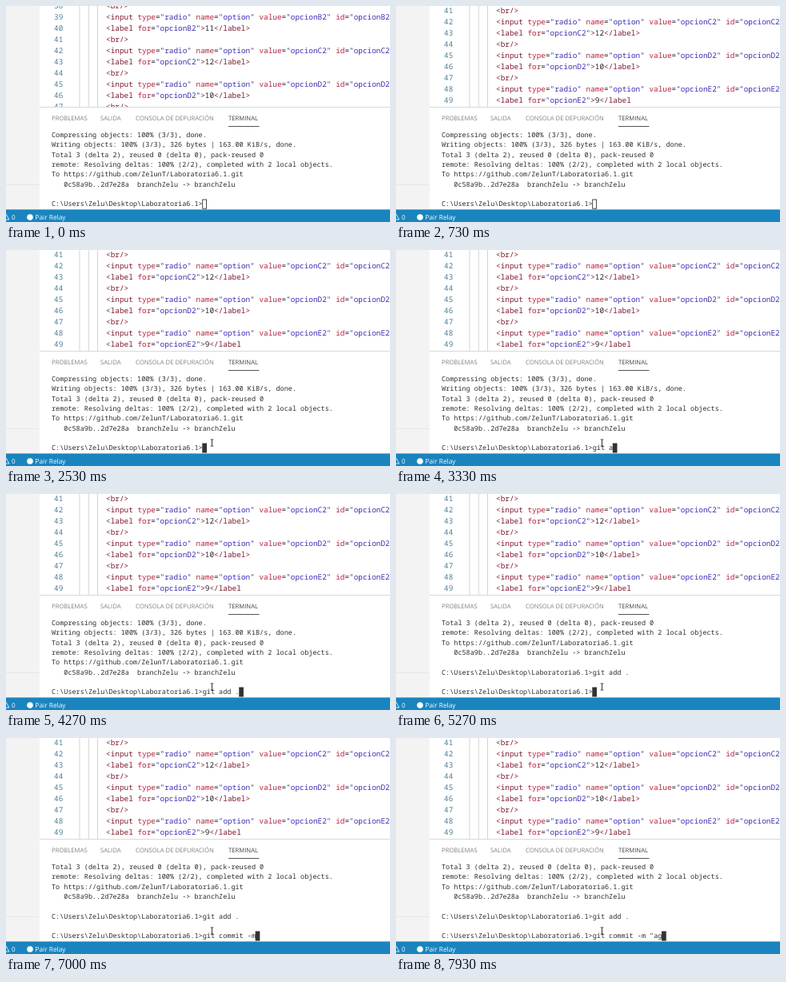
Write an HTML page with a canvas that moves like this. It is 480 by 270 pixels and loops after 8 s.

```html
<!DOCTYPE html>
<html lang="es">
<head>
<meta charset="utf-8">
<title>Terminal</title>
<style>
  html, body { margin: 0; width: 100%; height: 100%; overflow: hidden; background: #fff; }
  canvas { display: block; width: 480px; height: 270px; }
</style>
</head>
<body>
<canvas id="stage"></canvas>
<script>
const LOOP = 8000;
const SCROLL_AT = 70, POINTER_FROM = 930, POINTER_TO = 1200, FOCUS_AT = 1530, ENTER_AT = 4470;
const MONO = '"Noto Sans Mono", "DejaVu Sans Mono", monospace';
const SANS = '"Open Sans", "Noto Sans", sans-serif';
const CODE = { x: 125, char: 5.63, line: 13.95, size: 9.38 };
const TERM = { x: 57, y: 164, char: 5.105, line: 12.3, size: 8.51, rows: 8 };
const TAG = '#7d1a2e', ATTR = '#b5243f', VALUE = '#3a2fb0', TEXT = '#222';

const PROMPT = 'C:\\Users\\Zelu\\Desktop\\Laboratoria6.1>';
const HISTORY = [
  'Compressing objects: 100% (3/3), done.',
  'Writing objects: 100% (3/3), 326 bytes | 163.00 KiB/s, done.',
  'Total 3 (delta 2), reused 0 (delta 0), pack-reused 0',
  'remote: Resolving deltas: 100% (2/2), completed with 2 local objects.',
  'To https://github.com/ZelunT/Laboratoria6.1.git',
  '   0c58a9b..2d7e28a  branchZelu -> branchZelu',
  ''
];

// Each key of a command appears at the matching time.
const ADD = { text: 'git add .', times: [2870, 3000, 3070, 3200, 3330, 3470, 3530, 3670, 3870] };
const COMMIT = {
  text: 'git commit -m "ag',
  times: [5330, 5400, 5470, 5600, 5670, 5730, 5800, 5870, 6000, 6130, 6270, 6530, 6800, 7070, 7470, 7670, 7870]
};
const typed = (command, t) => command.text.slice(0, command.times.filter(at => at <= t).length);

const options = [['B', 11], ['C', 12], ['D', 10], ['E', 9]];
const codeLines = options.flatMap(([letter, answer], i) => {
  const id = `"opcion${letter}2"`;
  const close = i === options.length - 1 ? '</label' : '</label>';
  return [
    [['<br/>', TAG]],
    [['<input ', TAG], ['type', ATTR], ['=', TEXT], ['"radio" ', VALUE],
     ['name', ATTR], ['=', TEXT], ['"option" ', VALUE],
     ['value', ATTR], ['=', TEXT], [id + ' ', VALUE],
     ['id', ATTR], ['=', TEXT], [id, VALUE], ['>', TAG]],
    [['<label ', TAG], ['for', ATTR], ['=', TEXT], [id, VALUE], ['>', TAG],
     [String(answer), TEXT], [close, TAG]]
  ];
});

const canvas = document.getElementById('stage');
const ctx = canvas.getContext('2d');
const ratio = window.devicePixelRatio || 1;
canvas.width = 480 * ratio;
canvas.height = 270 * ratio;
ctx.scale(ratio, ratio);
ctx.textRendering = 'geometricPrecision';

function rect(x, y, w, h, color) {
  ctx.fillStyle = color;
  ctx.fillRect(x, y, w, h);
}

function write(text, x, y, color, size, family) {
  ctx.font = `${size}px ${family}`;
  ctx.fillStyle = color;
  ctx.fillText(text, x, y);
}

function drawEditor(t) {
  const top = t < SCROLL_AT ? 3.4 : -32.9;
  ctx.save();
  ctx.beginPath();
  ctx.rect(42, 0, 438, 126);
  ctx.clip();
  for (let level = 0; level < 3; level++) {
    rect(91.5 + level * 2 * CODE.char, 0, 1, 126, '#d3d3d3');
  }
  codeLines.forEach((tokens, i) => {
    const y = top + i * CODE.line;
    write(String(38 + i), 60, y, '#4f7f95', CODE.size, MONO);
    let column = 0;
    for (const [text, color] of tokens) {
      write(text, CODE.x + column * CODE.char, y, color, CODE.size, MONO);
      column += text.length;
    }
  });
  ctx.restore();
}

function drawTabs() {
  rect(42, 126, 438, 1, '#d8d8d8');
  const tabs = [['PROBLEMAS', 57], ['SALIDA', 118], ['CONSOLA DE DEPURACIÓN', 162], ['TERMINAL', 278]];
  for (const [label, x] of tabs) {
    write(label, x, 143, label === 'TERMINAL' ? '#424242' : '#808080', 7.7, SANS);
  }
  rect(278, 150, 38.5, 1, '#555');
}

function drawTerminal(t) {
  const entered = t >= ENTER_AT;
  const current = PROMPT + typed(entered ? COMMIT : ADD, t);
  const done = entered ? [PROMPT + ADD.text, ''] : [];
  const rows = [...HISTORY, ...done, current].slice(-TERM.rows);
  rows.forEach((row, i) => write(row, TERM.x, TERM.y + i * TERM.line, '#2c2c2c', TERM.size, MONO));

  const x = TERM.x + current.length * TERM.char - 0.6;
  const width = TERM.char + 0.6;
  if (t >= FOCUS_AT) {
    rect(x, 241.5, width, 12, '#333');
  } else {
    ctx.strokeStyle = '#333';
    ctx.lineWidth = 0.9;
    ctx.strokeRect(x + 0.4, 242, width - 0.8, 11.2);
  }
}

function drawPointer(t) {
  if (t < POINTER_FROM) return;
  const left = 1 - Math.min(1, (t - POINTER_FROM) / (POINTER_TO - POINTER_FROM));
  const x = 257.5 + 70 * left ** 3, y = 241 - 80 * left ** 3;
  rect(x - 0.5, y - 4, 1, 8, '#333');
  rect(x - 2, y - 4.5, 4, 0.8, '#333');
  rect(x - 2, y + 3.7, 4, 0.8, '#333');
}

function drawStatusBar() {
  rect(0, 254.4, 480, 15.6, '#1a84be');
  ctx.strokeStyle = '#fff';
  ctx.lineWidth = 0.8;
  ctx.beginPath();
  ctx.moveTo(-4, 267);
  ctx.lineTo(0, 260);
  ctx.lineTo(4, 267);
  ctx.closePath();
  ctx.stroke();
  write('0', 7, 267, '#fff', 8.1, SANS);
  ctx.beginPath();
  ctx.arc(30, 264, 3.8, 0, Math.PI * 2);
  ctx.fill();
  write('Pair Relay', 36.5, 267, '#fff', 8.3, SANS);
}

function frame(now) {
  const t = now % LOOP;
  rect(0, 0, 480, 270, '#fff');
  rect(0, 0, 42, 255, '#f3f3f3');
  rect(0, 223, 42, 1, '#e6e6e6');
  drawEditor(t);
  drawTabs();
  drawTerminal(t);
  drawPointer(t);
  drawStatusBar();
  requestAnimationFrame(() => frame(performance.now() - start));
}

const start = performance.now();
frame(0);
</script>
</body>
</html>
```
